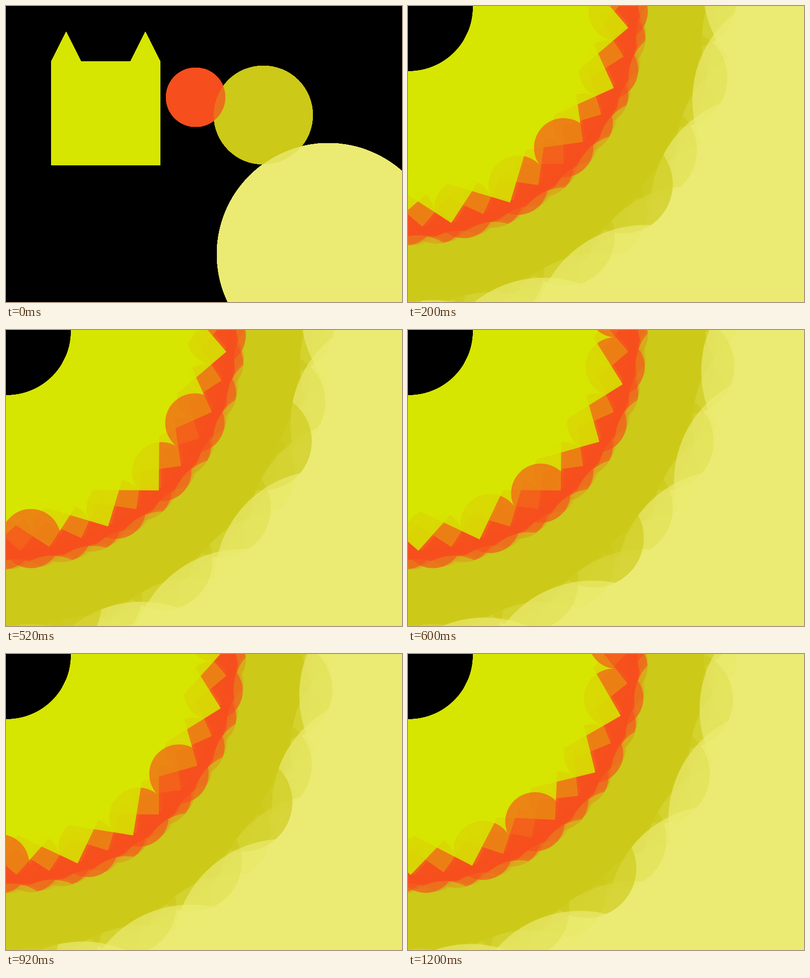
An HTML page with a canvas that plays this animation: 800 by 600 pixels, repeating every 1.4 s.

```html
<!DOCTYPE html>
<html lang="en">
<head>
<meta charset="utf-8">
<title>Spinning shapes</title>
<style>
  html, body { margin: 0; width: 100%; height: 100%; overflow: hidden; background: #000; }
  canvas { display: block; }
</style>
</head>
<body>
<canvas id="stage" width="800" height="600"></canvas>
<script>
const ctx = document.getElementById('stage').getContext('2d');
const HOLD = 200;
const PIVOT = [1.5, 2.5];
// Turns (one radian each) painted by the start of every hold.
const TURNS = [0, 373, 378, 390, 397, 421, 478];
let painted = 0;
let shown = Infinity;

function fill(color, alpha) {
  ctx.globalAlpha = alpha;
  ctx.fillStyle = color;
  ctx.fill();
}

function ear(x, y) {
  ctx.lineTo(x, y);
  ctx.lineTo(x + 30, y - 60);
  ctx.lineTo(x + 60, y);
}

function cat(x, y, w, h) {
  ctx.beginPath();
  ctx.moveTo(x, y + h);
  ear(x, y);
  ear(x + w - 60, y);
  ctx.lineTo(x + w, y + h);
  fill('#d7e700', 0.86);
}

function circle(x, y, r, color) {
  ctx.beginPath();
  ctx.arc(x, y, r, 0, 2 * Math.PI);
  fill(color, 0.64);
}

function paint(turn) {
  const c = Math.cos(turn), s = Math.sin(turn);
  ctx.setTransform(c, s, -s, c, ...PIVOT);
  cat(90, 110, 220, 210);
  circle(518.3, 218.5, 100, '#cdca1a');
  circle(381.7, 182.5, 60, '#f7501e');
  circle(649.5, 500.5, 225, '#eded74');
}

// Clear, then layer the unturned shapes until they are opaque.
function restart() {
  ctx.reset();
  for (let i = 0; i < 30; i++) paint(0);
  painted = 0;
}

function render(now) {
  const step = Math.floor(now / HOLD) % TURNS.length;
  if (step === shown) return;
  if (step < shown) restart();
  while (painted < TURNS[step]) paint(++painted);
  shown = step;
}

const start = performance.now();
function tick() {
  render(performance.now() - start);
  requestAnimationFrame(tick);
}
tick();
</script>
</body>
</html>
```
